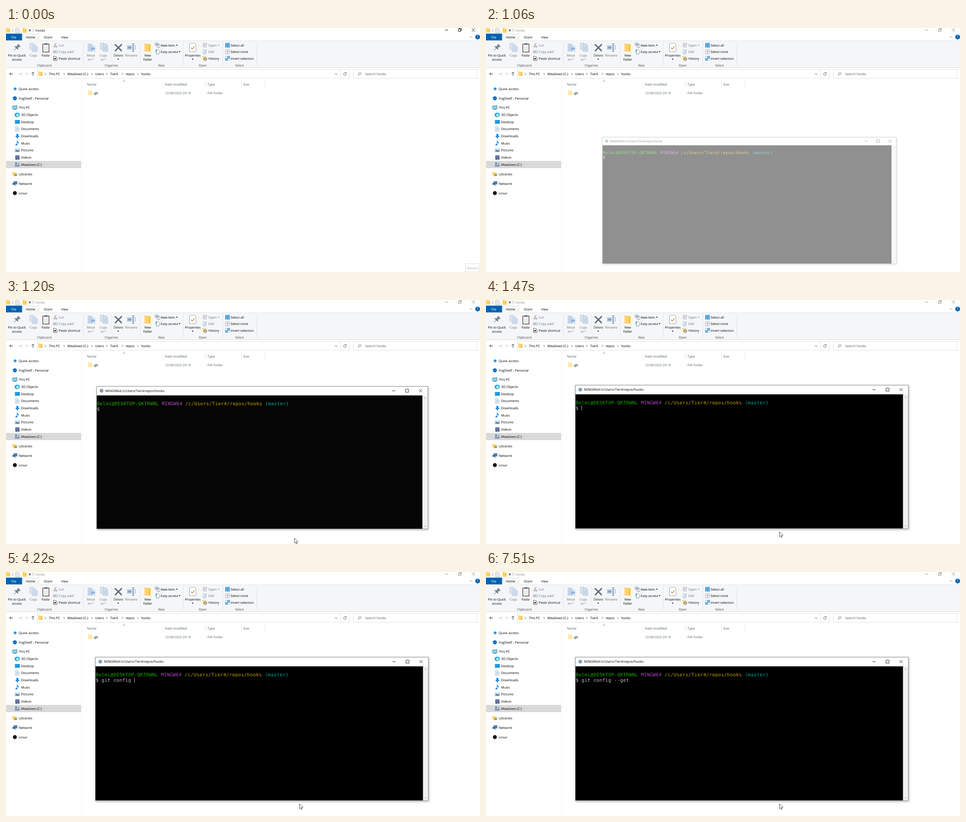
Write an HTML page that moves like this. It is 1042 by 538 pixels and loops after 8 s.

```html
<!DOCTYPE html>
<html lang="en">
<head>
<meta charset="utf-8">
<title>Hooks folder</title>
<style>
  html, body { margin: 0; width: 100%; height: 100%; overflow: hidden; background: #fff; }
  svg { display: block; width: 100vw; height: 100vh; }
  text { font-family: "Open Sans", "Noto Sans", sans-serif; font-weight: 500; text-rendering: geometricPrecision; white-space: pre; }
  .mono { font: 10.3px "DejaVu Sans Mono", monospace; letter-spacing: .329px; }
  #term { filter: drop-shadow(1px 2px 2.5px rgba(0, 0, 0, .3)); }
</style>
</head>
<body>
<svg id="stage" viewBox="0 0 1042 538" preserveAspectRatio="none"></svg>
<script>
const LOOP = 8000;
const INK = '#000', DIM = '#6f6f6f', BLUE = '#1e88d8', SLATE = '#5b6b80', PALE = '#c3d3e8', GOLD = '#ffd56b';

// Drawing helpers; each returns markup.
const rect = (x, y, w, h, fill, stroke = 'none', sw = .8) =>
  `<rect x="${x}" y="${y}" width="${w}" height="${h}" fill="${fill}" stroke="${stroke}" stroke-width="${sw}"/>`;
const path = (d, fill = 'none', stroke = 'none', sw = .9) =>
  `<path d="${d}" fill="${fill}" stroke="${stroke}" stroke-width="${sw}"/>`;
const line = (d, stroke = INK, sw = .9) => path(d, 'none', stroke, sw);
const circle = (x, y, r, fill, stroke = 'none', sw = .9) =>
  `<circle cx="${x}" cy="${y}" r="${r}" fill="${fill}" stroke="${stroke}" stroke-width="${sw}"/>`;
// y is the optical middle of the line
const text = (x, y, s, fill = INK, size = 7.36, anchor = 'start') =>
  `<text x="${x}" y="${y + 2.6}" font-size="${size}" fill="${fill}" text-anchor="${anchor}">${s}</text>`;
const label = (x, y, s, fill = INK) => text(x, y, s, fill, 7.1);
const mid = (x, y, s, fill = INK) => text(x, y, s, fill, 7.1, 'middle');
const drop = (x, y, fill = INK) => path(`M${x - 2} ${y - 1}h4l-2 2.2z`, fill);
const chevron = (x, y, dir, stroke = '#444', r = 2.2) => {
  const v = { right: [-.5, -1, .5, 0, -.5, 1], down: [-1, -.5, 0, .5, 1, -.5], up: [-1, .5, 0, -.5, 1, .5] }[dir];
  return line(`M${x + v[0] * r} ${y + v[1] * r}L${x + v[2] * r} ${y + v[3] * r}L${x + v[4] * r} ${y + v[5] * r}`, stroke);
};
const folder = (x, y, w = 9, h = 10.5, fill = GOLD, shade = '#f2be45') =>
  path(`M${x} ${y}h${w * .4}l1 1h${w * .6 - 1}v${h - 1}h${-w}z`, fill) +
  path(`M${x + w * .75} ${y + 2}h${w * .25}v${h - 2}h${-w * .25}z`, shade);
const page = (x, y, w, h, fill = '#fff', stroke = '#8b97a5') =>
  path(`M${x} ${y}h${w - 2.5}l2.5 2.5v${h - 2.5}h${-w}z`, fill, stroke, .8);
const rows = (x, y, w, n, gap, stroke) =>
  Array.from({ length: n }, (_, i) => line(`M${x} ${y + i * gap}h${w}`, stroke, .7)).join('');
const check = (x, y, k) => line(`M${x} ${y}l${2 * k} ${2.4 * k}l${4 * k} ${-5 * k}`, '#e2703a', 1.1 * Math.sqrt(k));

function titleBar() {
  return folder(0, 0, 9, 10) + line('M14.5 1v8M59.5 1v8', '#8a8a8a', .7) +
    page(21.5, .5, 8, 10) + check(23, 5.5, .8) + folder(36, 0, 9, 10.5) +
    line('M50 4h4.4') + drop(52.2, 6.6) +
    `<g id="caption">${text(65, 5, 'hooks', 'currentColor')}` +
    line('M965 4.5h7M1024 1l7 7M1031 1l-7 7', 'currentColor', .9) +
    line('M994.5 2.5h5v5h-5zM996 2.3v-1.5h5v5h-1.5', 'currentColor', .9) + '</g>';
}

function tabs() {
  return rect(0, 12.4, 35.4, 15.2, '#0063b1') + rect(0, 28, 1042, 60, '#f5f6f7') +
    line('M0 27.8H36.3V12.3H73V27.8H1042', '#dfe1e3', .8) + rect(36.7, 12.7, 36, 16, '#f5f6f7') +
    line('M0 87.7H1042', '#d8d9db', .9) +
    mid(17, 20, 'File', '#fff') + mid(54, 20, 'Home') + mid(92.5, 20, 'Share') + mid(129, 20, 'View') +
    chevron(1022, 20, 'up', '#888', 2.6) + circle(1036.8, 19.8, 5.2, '#0063b1') +
    text(1036.8, 19.8, '?', '#fff', 8, 'middle');
}

function clipboardGroup() {
  const copy = (x, y) => page(x, y, 11, 14, '#dbe5f1', '#b4c5da') + page(x + 5.5, y + 5, 11, 14, '#d3dfee', '#b4c5da') +
    rows(x + 7.5, y + 10, 7, 3, 2.5, '#b4c5da');
  return '<g transform="rotate(45 24 43)">' +
    path('M20 35.5h8v2h-1.5v4.5q2.7 1 2.7 3.2h-10.4q0-2.2 2.7-3.2v-4.5h-1.5z', '#75828f') + line('M24 45v7', '#75828f', 1.1) + '</g>' +
    copy(52.5, 33.5) +
    rect(81, 35.5, 13.5, 17.5, '#fff', '#5f4a3a', 1.5) + rect(84.5, 33.7, 6.5, 3.4, '#5f6a75') + rows(83.5, 41, 8.5, 4, 2.7, '#a7b4c2') +
    line('M106 33l4.5 7M111 33l-4.5 7', '#7b8794') + circle(106.3, 41, 1.5, 'none', '#7b8794') + circle(110.7, 41, 1.5, 'none', '#7b8794') +
    rect(104, 50, 9, 5, '#dfe7f0', '#98a7b8') + line('M105.5 51.5l1 2 1-2 1 2 1-2', '#6c7d90', .7) +
    page(104.5, 62.5, 7.5, 9, '#fff', '#333') + path('M106 70v-3.5h2v-1.6l2.7 2.6-2.7 2.5v-1.6h-.8v1.6z', '#333') +
    mid(24, 60.5, 'Pin to Quick') + mid(24, 69, 'access') + mid(60, 60.5, 'Copy', DIM) + mid(87, 60.5, 'Paste') +
    label(116, 38, 'Cut', DIM) + label(116, 52.5, 'Copy path', DIM) + label(116, 67, 'Paste shortcut') + mid(84, 82, 'Clipboard', '#444');
}

function organiseGroup() {
  return folder(179.5, 34, 10, 18, PALE, '#b3c6e0') + rect(188, 39, 8, 13, '#d3dfee') +
    path('M186 45.5l5-4.5v2.7h5v3.6h-5v2.7z', '#90b2dc') +
    page(207.5, 33.5, 11, 14, '#dbe5f1', '#a9bdd6') + page(213, 35.5, 11, 16, '#d3dfee', '#a9bdd6') + rows(215, 41, 7, 4, 2.5, '#a9bdd6') +
    line('M231 32v38', '#e1e3e5', .8) +
    line('M239.5 36l15 15M254.5 36l-15 15', '#56657a', 2.8) +
    rect(266.5, 39, 18, 8, '#dde8f5', '#8fa9c8') + rect(268, 40.5, 8, 5, '#7fa7d6') + line('M277 34.5h5M279.5 34.5v17M277 51.5h5', SLATE, 1.1) +
    mid(186.5, 60.5, 'Move', DIM) + mid(183.5, 69, 'to', DIM) + drop(190, 69, '#999') +
    mid(214, 60.5, 'Copy', DIM) + mid(211.5, 69, 'to', DIM) + drop(218, 69, '#999') +
    mid(246.7, 60.5, 'Delete', '#222') + drop(246.7, 68.7) + mid(275.3, 60.5, 'Rename', DIM) + mid(231.5, 82, 'Organise', '#444');
}

function newGroup() {
  return folder(304.5, 34, 13, 18) + mid(311.5, 60.5, 'New') + mid(311.5, 69, 'folder') +
    rect(328, 33, 5, 5, '#fff', '#68798c') + rect(330.5, 35, 6, 4.5, '#cfe0f3', '#68798c') + page(333, 37, 5, 6, '#fff', '#68798c') +
    label(340, 38, 'New item') + drop(375.6, 38) +
    page(330.5, 47.5, 6.5, 9.5, '#fff', '#68798c') + line('M328 49.5h4.5M328 52h4', BLUE, 1.1) +
    label(340, 52.5, 'Easy access') + drop(381.3, 52.2) + mid(341.5, 82, 'New', '#444');
}

function openGroup() {
  return page(403.5, 34, 14, 18.5) + check(407, 43.5, 1.25) + mid(410.7, 60.5, 'Properties') + drop(410.4, 68.7) +
    rect(433.5, 33.5, 7.5, 8.5, '#e5eaf0', '#a5b1be') + line('M433.5 36h7.5', '#a5b1be') + rect(434.8, 38, 2, 2.5, '#9fb5cf') +
    label(445, 38, 'Open', DIM) + drop(467.8, 38, '#999') +
    page(433.5, 47.5, 7, 9.5, '#e6eef7', '#a5b9cf') + line('M435 55.5l5.5-7', '#8ba0b8', 1.2) + label(445, 52.5, 'Edit', DIM) +
    folder(432.5, 61.5, 6.5, 10) + circle(438.3, 68.5, 3.1, '#dfe8ef', '#333') + line('M438.3 66.8v1.8h1.4', '#333', .7) +
    label(445, 67, 'History') + mid(432.3, 82, 'Open', '#444');
}

function selectGroup() {
  const grid = (y, on) => [0, 1, 2, 3].map(i =>
    rect(482.3 + i % 2 * 5.2, y + (i >> 1) * 5.2, 4.2, 4.2, on(i) ? '#6fbdf0' : '#fff', on(i) ? '#2585c7' : '#9aa7b5', .7)).join('');
  return grid(33.3, () => true) + grid(47.7, () => false) + grid(62.2, i => i === 1 || i === 2) +
    label(494, 38, 'Select all') + label(494, 52.5, 'Select none') + label(494, 67, 'Invert selection') + mid(513.5, 82, 'Select', '#444');
}

function addressRow() {
  const crumbs = [[94, 'This PC'], [135, 'Meadows (C:)'], [196, 'Users'], [229, 'Tier4'], [263, 'repos'], [297, 'hooks']];
  return line('M15.5 101.3H8M11 98l-3.3 3.3 3.3 3.3', '#333', 1) + line('M27 101.3h7.5M31 98l3.3 3.3-3.3 3.3', '#c3c3c3', 1) +
    chevron(46, 101, 'down', '#777', 1.8) + line('M59.2 105.5v-8M56 100.5l3.2-3.2 3.2 3.2', '#333', 1) +
    rect(68.4, 91.4, 686.6, 19.6, '#fff', '#d9d9d9') + line('M735.4 91.4v19.6', '#d9d9d9', .8) +
    rect(763.4, 91.4, 272.6, 19.6, '#fff', '#d9d9d9') + folder(71, 95.5, 9, 10.5) +
    crumbs.map(([x, s]) => chevron(x - 7.2, 101.3, 'right') + text(x, 101, s)).join('') +
    chevron(725.8, 101.3, 'down', '#444', 2.8) +
    line('M747.6 99.6a3 3 0 1 0 .6 2.4M748.2 97.8v2.4h-2.4', '#444') +
    circle(778, 100.2, 2.6, 'none', '#666', .8) + line('M776 102.2l-3 3', '#666', .9) + text(789.7, 101, 'Search hooks', '#5c5c5c');
}

function sidebar() {
  const icons = {
    star: y => path(`M20 ${y - 4.6}l1.2 3.1 3.4.2-2.6 2.1.9 3.4-2.9-1.9-2.9 1.9.9-3.4-2.6-2.1 3.4-.2z`, BLUE),
    dot: y => circle(19.5, y, 4.6, '#1377d1'),
    pc: y => rect(14.5, y - 4.3, 10, 7, '#86cdf5', '#3c7ba6', .8) + line(`M17 ${y + 4.2}h5`, '#3c7ba6', 1),
    cube: y => path(`M20 ${y - 3}l5-2 5 2v6l-5 2-5-2z`, '#35aee4') + path(`M23 ${y - 1.5}h4.5v4.5h-4.5z`, '#d5f0fb') + line(`M20 ${y - 3}v6l5 2`, '#1874ad', 1),
    desk: y => rect(20, y - 3.7, 10, 7.5, '#179be3', '#1f78b8', .7),
    doc: y => page(21, y - 5, 7.5, 10) + rows(22.5, y - 2, 4.5, 3, 2, '#4a90c8'),
    down: y => path(`M22.7 ${y - 5}h4.6v4.5h2.8l-5.1 5.6-5.1-5.6h2.8z`, '#2e8ede'),
    note: y => line(`M24.5 ${y + 3}v-8q.5 2.5 3.4 3.8-.3 1.2-1 2`, '#1a86d8', 1.3) + `<ellipse cx="22.9" cy="${y + 3.2}" rx="2.1" ry="1.7" fill="#1a86d8"/>`,
    pic: y => rect(20, y - 3.5, 10, 7, '#e4f2fb', '#8aa0b2', .8) + path(`M21 ${y + 2.7}v-2.2l3-2 2 1.5 3-.8v3.5z`, '#3a80b4'),
    film: y => rect(20.5, y - 4.6, 9, 9.3, '#2e3d52') + rect(22.5, y - 3.6, 5, 3.2, '#6f9fd6') + rect(22.5, y + .5, 5, 3.2, '#8a6fb0') +
      `<path d="M21.5 ${y - 4}v8.4M28.5 ${y - 4}v8.4" stroke="#dfe5ec" stroke-width=".7" stroke-dasharray="1 1"/>`,
    drive: y => rect(20, y - 4.4, 4.2, 4.2, '#2a9fe6') + rect(20, y + 1.2, 10, 3, '#9aa4ad', '#5c666f', .6) + rows(25.5, y - 3.5, 4, 3, 1.5, '#7f8a93') + rect(27.5, y + 2.2, 1.4, 1, '#56e07a'),
    libs: y => folder(14.5, y - 4.5, 7, 8.5) + rect(17.5, y - 1.5, 7, 6, '#f3b94a') + rect(19.5, y + .5, 4, 3.5, '#4a9ad6'),
    net: y => rect(17, y - 4.5, 7.5, 5.5, '#3292d8', '#41617c', .7) + path(`M14 ${y - 1}h4v-1.5l4.5 3.2-4.5 3.2v-1.5h-4z`, '#356f9f') + line(`M19 ${y + 4}h4`, '#41617c'),
    disc: y => circle(19.5, y, 4.4, '#151515')
  };
  const items = [['star', 134, 'Quick access'], ['dot', 155, 'FogShelf - Personal'], ['pc', 175.7, 'This PC'],
    ['cube', 191.3, '3D Objects', 1], ['desk', 207, 'Desktop', 1], ['doc', 222.7, 'Documents', 1], ['down', 238.5, 'Downloads', 1],
    ['note', 254, 'Music', 1], ['pic', 269.8, 'Pictures', 1], ['film', 285.5, 'Videos', 1], ['drive', 301, 'Meadows (C:)', 1],
    ['libs', 322, 'Libraries'], ['net', 343, 'Network'], ['disc', 364, 'Linux']];
  return rect(0, 293, 165, 16, '#d9d9d9') + line('M166 115V538', '#f0f0f0', .9) +
    items.map(([icon, y, s, inner]) => icons[icon](y) + text(inner ? 33 : 28, y, s)).join('');
}

function fileList() {
  const head = '#4c607a';
  return line('M345 116v16.5M438.6 116v16.5M517.2 116v16.5M569.5 116v16.5', '#e3e3e3', .9) +
    chevron(259.5, 117.2, 'up', '#666', 2.6) +
    text(178.3, 124.3, 'Name', head) + text(349, 124.3, 'Date modified', head) + text(443, 124.3, 'Type', head) + text(521.5, 124.3, 'Size', head) +
    folder(180, 137, 9, 11, '#ffe9a6', '#fbdc85') +
    text(192, 143, '.git') + text(349, 143, '12/08/2023 20:18', '#666', 7.1) + text(443, 143, 'File folder', '#666', 7.3);
}

// Terminal grid
const CELL = 6.53, LEFT = 197;
function terminal() {
  const prompt = [['#1ca800', 'Belmi@DESKTOP-QKTRWNL '], ['#b148c6', 'MINGW64 '], ['#c0a000', '/c/Users/Tier4/repos/hooks '], ['#00a89a', '(master)']];
  return rect(196.4, 187.9, 732, 316, '#fff', '#6b6b6b') + rect(196.8, 208, 720, 295.5, '#000') + rect(916.8, 208, 11.2, 295.5, '#f0f0f0') +
    circle(207.3, 197.6, 4.2, '#7d9fbd') + text(215.5, 197.8, 'MINGW64:/c/Users/Tier4/repos/hooks') +
    line('M849.5 197.8h7M879.3 194.3h6.7v6.7h-6.7zM909.2 194.2l6.8 6.8M916 194.2l-6.8 6.8', '#111', .9) +
    chevron(922.4, 214, 'up', '#8a8a8a') + chevron(922.4, 498, 'down', '#8a8a8a') +
    `<text class="mono" x="${LEFT}" y="229.5">` + prompt.map(([c, s]) => `<tspan fill="${c}">${s}</tspan>`).join('') + '</text>' +
    `<text class="mono" id="cmd" x="${LEFT}" y="241.5" fill="#bfbfbf"></text>` +
    '<rect id="caret" y="232.3" width=".9" height="11.5" fill="#bfbfbf"/>';
}

const stage = document.getElementById('stage');
stage.innerHTML = rect(0, 0, 1042, 538, '#fff') + titleBar() + tabs() +
  line('M170.3 31v54M295.3 31v54M389.4 31v54M476.6 31v54M551.5 31v54', '#e1e3e5', .9) +
  clipboardGroup() + organiseGroup() + newGroup() + openGroup() + selectGroup() + addressRow() + sidebar() + fileList() +
  `<g id="record">${rect(1010.4, 519.9, 31.2, 18, '#fff', '#cfcfcf')}${text(1026, 529, 'Record', '#adadad', 7.6, 'middle')}</g>` +
  `<g id="term">${terminal()}</g>` +
  `<g id="mouse">${path('M0 0V11.2L2.6 8.8 4.4 12.8 6.1 12 4.4 8.1H8Z', '#fff', '#222', .8)}</g>`;
const [caption, record, term, cmd, caret, mouse] =
  ['caption', 'record', 'term', 'cmd', 'caret', 'mouse'].map(id => document.getElementById(id));

const COMMAND = 'git config --get ';
const KEYS = [2080, 2150, 2280, 2480, 3070, 3200, 3470, 3750, 3950, 4150, 4220, 4810, 4940, 5410, 5480, 5680, 5950];
// time, scale, opacity of the opening window
const OPENING = [[0, .88, 0], [1060, .8826, .43], [1130, .958, .8], [1200, .9945, .975], [1260, 1, 1]];
const POINTER = [[1200, 634, 525], [1260, 640, 517.5], [1330, 643.5, 513], [1400, 645, 511]];
const ORIGIN = { x: 703, y: 639 };
const at = (steps, t) => steps.filter(s => s[0] <= t).pop();
const show = (node, on) => node.setAttribute('visibility', on ? 'visible' : 'hidden');

function draw(t) {
  caption.style.color = t < 70 ? '#000' : '#8c8c8c';
  show(record, t < 70);

  const [, k, alpha] = at(OPENING, t);
  show(term, alpha > 0);
  term.style.opacity = alpha;
  term.setAttribute('transform', `translate(${ORIGIN.x * (1 - k)} ${ORIGIN.y * (1 - k)}) scale(${k})`);

  const typed = KEYS.filter(key => key <= t).length;
  cmd.textContent = '$ ' + COMMAND.slice(0, typed);
  caret.setAttribute('x', LEFT + (typed + 2) * CELL);
  const blinkOff = t >= 6450 && Math.floor((t - 6450) / 530) % 2 === 0;
  caret.setAttribute('opacity', t >= 1470 && !blinkOff ? 1 : 0);

  const tip = at(POINTER, t);
  show(mouse, tip);
  if (tip) mouse.setAttribute('transform', `translate(${tip[1]} ${tip[2]})`);
}

const start = performance.now();
function tick() {
  draw((performance.now() - start) % LOOP);
  requestAnimationFrame(tick);
}
tick();
</script>
</body>
</html>
```
